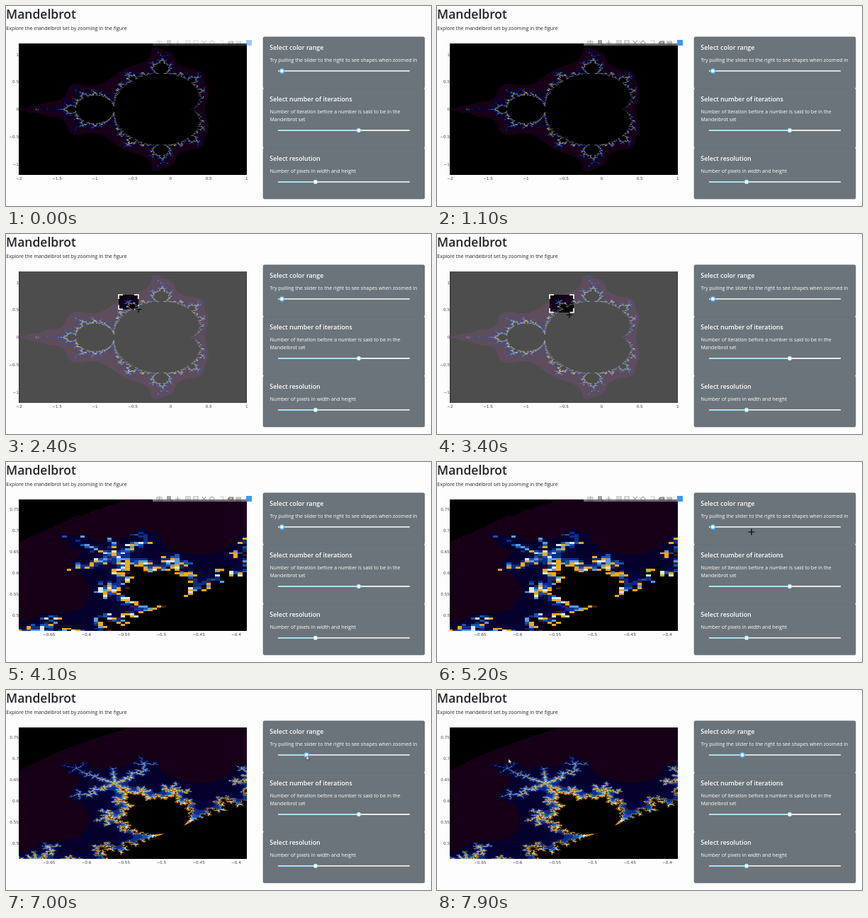
These frames come from a looping animation (600x283 px, 8000 ms). An HTML page with a canvas:

```html
<!DOCTYPE html>
<html lang="en">
<head>
<meta charset="utf-8">
<title>Mandelbrot</title>
<style>
  html, body { margin: 0; width: 100%; height: 100%; overflow: hidden; background: #fefdfe; }
  canvas, svg { position: absolute; left: 0; top: 0; width: 600px; height: 283px; }
  text { font-family: "Open Sans", "Noto Sans", sans-serif; font-size: 7.06px; fill: #212529; }
  .title { font-size: 17.5px; font-weight: 600; }
  .card { fill: #6b747a; }
  .card text { fill: #fff; }
  .card .head { font-size: 8.9px; font-weight: 600; }
  .ticks text { font-family: "DejaVu Sans", sans-serif; font-size: 5.7px; fill: #444; }
  .icons { fill: none; stroke: #444; stroke-opacity: .45; stroke-width: 1.2; }
  .icons .on { stroke-opacity: .85; }
  .rail { stroke: #e9e9e9; stroke-width: 1.9; }
  .fill { stroke: #abe2fb; stroke-width: 1.9; }
  .knob { fill: #fff; stroke: #96dbfa; }
  .active .knob { stroke: #57b5f7; stroke-width: 1.3; }
</style>
</head>
<body>
<canvas id="plot" width="600" height="283"></canvas>
<svg viewBox="0 0 600 283">
  <text class="title" x="0" y="18">Mandelbrot</text>
  <text x="0.3" y="33.6">Explore the mandelbrot set by zooming in the figure</text>
  <g class="ticks" id="ticks"></g>

  <g id="toolbar">
    <rect x="207" y="47" width="140.5" height="9" fill="#fff" fill-opacity=".42"/>
    <g class="icons">
      <path d="M213 50h7v5h-7zM215 49.5h3"/>
      <circle cx="216.5" cy="52.5" r="1.1"/>
      <path class="on" d="M228 49h4v4h-4zM232 53l2.5 2.5M229 51h2"/>
      <path d="M242.5 48.5v7M239 52h7"/>
      <path d="M254 49h6v6h-6zM255.5 52h3M257 50.5v3"/>
      <path d="M265 49h6v6h-6zM266.5 52h3"/>
      <path d="M276.5 49l6 6M282.5 49l-6 6"/>
      <path d="M287 52l3.7-3 3.7 3M288.2 52v3h5v-3"/>
      <path d="M302 49h4.5v6" stroke-dasharray="1.2 .7"/>
      <path class="on" d="M313.5 52l2-2h5v4h-5zM315 52h5"/>
      <path d="M325 50h6.5v1.7H325zM325 53h6.5v1.7H325z"/>
    </g>
    <rect x="339" y="48" width="8" height="8" fill="#3f96ee"/>
  </g>

  <g id="cards"></g>

  <g id="zoombox">
    <path id="shade" fill="#fff" fill-opacity=".3" fill-rule="evenodd"/>
    <path class="corner" fill="none" stroke="#444" stroke-width="2.4"/>
    <path class="corner" fill="none" stroke="#fff" stroke-width="1.6"/>
  </g>
  <path id="cross" d="M-4.5 0h9M0-4.5v9" stroke="#000" stroke-width="1.2"/>
  <path id="arrow" d="M0 0v6.3l1.5-1.3 1.1 2.4 1-.5-1-2.2h2z" fill="#fff" stroke="#000" stroke-width=".5"/>
</svg>
<script>
const LOOP = 8000, STEP = 100, N = 500, BAND = 5, MAX = 80;
const PRESS = 2100, RELEASE = 3700, REFINE = 5600;
const $ = id => document.getElementById(id);
const all = css => document.querySelectorAll(css);

const plot = { left: 18.4, right: 339.7, top: 53, bottom: 239.4 };
const width = plot.right - plot.left, height = plot.bottom - plot.top;
const full = { x0: -2, x1: 1, y0: -1.2, y1: 1.2, dx: .5, dy: .5 };
const zoom = { x0: -.69, x1: -.386, y0: .4633, y1: .7733, dx: .05, dy: .05 };

// One colour per band of escape counts; slow points stay orange, then brown.
const palette = ["#000000", "#170017", "#06012c", "#04033c", "#0c2c8a", "#1852b1", "#5c9bdc", "#d3ecf8", "#ffaa00"];
const BROWN = "#421e0f", SLOW = 65;

function escapeCount(a, b) {
  let x = 0, y = 0;
  for (let n = -1; n < MAX; n++) {
    const xx = x * x, yy = y * y;
    if (xx + yy > 4) return n;
    y = 2 * x * y + b;
    x = xx - yy + a;
  }
  return MAX;
}

function colourOf(n) {
  if (n >= MAX) return palette[0];
  if (n >= SLOW) return BROWN;
  return palette[Math.min(Math.floor(n / BAND), palette.length - 1)];
}

function renderSet(v) {
  const c = document.createElement("canvas");
  c.width = c.height = N;
  const g = c.getContext("2d"), img = g.createImageData(N, N);
  const lut = Array.from({ length: MAX + 1 }, (_, n) => parseInt(colourOf(n).slice(1), 16));
  for (let j = 0, k = 0; j < N; j++) {
    const b = v.y1 - (v.y1 - v.y0) * j / (N - 1);
    for (let i = 0; i < N; i++, k += 4) {
      const a = v.x0 + (v.x1 - v.x0) * i / (N - 1);
      const rgb = lut[escapeCount(a, b)];
      img.data.set([rgb >> 16, rgb >> 8 & 255, rgb & 255, 255], k);
    }
  }
  g.putImageData(img, 0, 0);
  return c;
}

const fullSet = renderSet(full), zoomSet = renderSet(zoom);
const pen = $("plot").getContext("2d");
let shown = "";

function drawPlot(state) {
  if (state === shown) return;
  shown = state;
  const box = [plot.left, plot.top, width, height];
  pen.clearRect(0, 0, 600, 283);
  pen.imageSmoothingEnabled = state !== "coarse";
  pen.imageSmoothingQuality = "high";
  if (state === "coarse") {
    const col = x => (x - full.x0) / (full.x1 - full.x0) * (N - 1) + .5;
    const row = y => (full.y1 - y) / (full.y1 - full.y0) * (N - 1) + .5;
    const sx = col(zoom.x0), sy = row(zoom.y1);
    pen.drawImage(fullSet, sx, sy, col(zoom.x1) - sx, row(zoom.y0) - sy, ...box);
  } else {
    pen.drawImage(state === "full" ? fullSet : zoomSet, ...box);
  }
  drawTicks(state === "full" ? full : zoom);
}

function drawTicks(v) {
  const text = (x, y, anchor, n) =>
    `<text x="${x}" y="${y}" text-anchor="${anchor}">${String(+n.toFixed(2)).replace("-", "\u2212")}</text>`;
  let out = "";
  for (let i = Math.ceil(v.x0 / v.dx); i * v.dx <= v.x1; i++) {
    const n = i * v.dx;
    out += text(plot.left + (n - v.x0) / (v.x1 - v.x0) * width, 245.6, "middle", n);
  }
  for (let i = Math.ceil(v.y0 / v.dy); i * v.dy <= v.y1; i++) {
    const n = i * v.dy;
    out += text(18, plot.top + (v.y1 - n) / (v.y1 - v.y0) * height + 2.1, "end", n);
  }
  $("ticks").innerHTML = out;
}

const KNOB = 389.5;
const cards = [
  { y: 43.7, h: 73, knob: KNOB, head: "Select color range",
    lines: ["Try pulling the slider to the right to see shapes when zoomed in"] },
  { y: 116.8, h: 84, knob: 498, head: "Select number of iterations",
    lines: ["Number of iteration before a number is said to be in the", "Mandelbrot set"] },
  { y: 200.7, h: 72.3, knob: 437, head: "Select resolution",
    lines: ["Number of pixels in width and height"] }
];
$("cards").innerHTML = cards.map((c, i) => {
  const rail = c.y + 37.2 + 11 * c.lines.length;
  return `<g class="card ${i ? "" : "active"}">
    <rect x="363" y="${c.y}" width="228" height="${c.h}" rx="2" stroke="#596166" stroke-width=".5"/>
    <text class="head" x="372.3" y="${c.y + 18.6}">${c.head}</text>
    ${c.lines.map((s, j) => `<text x="372.5" y="${c.y + 34.8 + 11 * j}">${s}</text>`).join("")}
    <path class="rail" d="M384 ${rail}H570"/>
    <path class="fill" d="M384 ${rail}H${c.knob}"/>
    <circle class="knob" cx="${c.knob}" cy="${rail}" r="${i ? 2.8 : 3.1}"/>
  </g>`;
}).join("");

const ramp = (t, a, b) => Math.min(1, Math.max(0, (t - a) / (b - a)));
const mix = (a, b, p) => a + (b - a) * p;
const visible = (t, a, b) => Math.min(ramp(t, a, a + 200), ramp(t, b, b - 200));

const start = { x: 159, y: 86 };
const knobAt = t => mix(KNOB, 431, ramp(t, 6500, 7100));

// The dragged corner rushes out and settles.
function dragAt(t) {
  const p = 1 - (1 - ramp(t, PRESS, 3300)) ** 6;
  return { x: start.x + 34 * p, y: start.y + 25 * p };
}

const stops = [
  [RELEASE, 187, 114], [4100, 235, 215], [4500, 551, 40], [5200, 444, 99],
  [REFINE, 431.5, 94], [6200, 431.5, 94], [6500, KNOB, 92], [7100, 431, 93], [7900, 101, 97.5]
];

function cursorAt(t) {
  if (t < RELEASE) {
    const d = dragAt(t), drift = ramp(t, 2900, 3400), away = 1 - ramp(t, 1400, 2000);
    return [d.x - 6 * drift + 31 * away, d.y + 3.5 * drift + 44 * away];
  }
  const i = stops.findIndex(s => s[0] > t);
  if (i < 0) return stops[stops.length - 1].slice(1);
  const [t0, x0, y0] = stops[i - 1], [t1, x1, y1] = stops[i];
  const p = ramp(t, t0, t1);
  return [mix(x0, x1, p), mix(y0, y1, p)];
}

function drawBox(t) {
  const open = t >= PRESS && t < RELEASE;
  $("zoombox").style.display = open ? "" : "none";
  if (!open) return;
  const { x: l, y: u } = start, { x: r, y: d } = dragAt(t);
  const arm = Math.min(6, (r - l) / 2.5, (d - u) / 2.5);
  const corner = (x, y, sx, sy) => `M${x} ${y + sy * arm}V${y}H${x + sx * arm}`;
  const path = corner(l, u, 1, 1) + corner(r, u, -1, 1) + corner(l, d, 1, -1) + corner(r, d, -1, -1);
  $("zoombox").style.opacity = ramp(t, PRESS, PRESS + 300) ** 1.6;
  $("shade").setAttribute("d",
    `M${plot.left} ${plot.top}h${width}v${height}h${-width}zM${l} ${u}H${r}V${d}H${l}z`);
  all(".corner").forEach(e => e.setAttribute("d", path));
}

function frame() {
  const t = Math.floor(performance.now() % LOOP / STEP) * STEP;
  drawPlot(t < RELEASE ? "full" : t < REFINE ? "coarse" : "fine");
  drawBox(t);
  $("toolbar").style.opacity = visible(t, -100, PRESS + 200) + visible(t, RELEASE - 100, REFINE + 100);

  const knob = knobAt(t);
  all(".active .knob")[0].setAttribute("cx", knob);
  all(".active .fill")[0].setAttribute("d", `M384 ${cards[0].y + 48.2}H${knob}`);

  const [x, y] = cursorAt(t);
  for (const id of ["cross", "arrow"]) {
    $(id).setAttribute("transform", `translate(${x} ${y})`);
    $(id).style.display = (id === "cross") === (t < REFINE) ? "" : "none";
  }
  requestAnimationFrame(frame);
}
frame();
</script>
</body>
</html>
```
